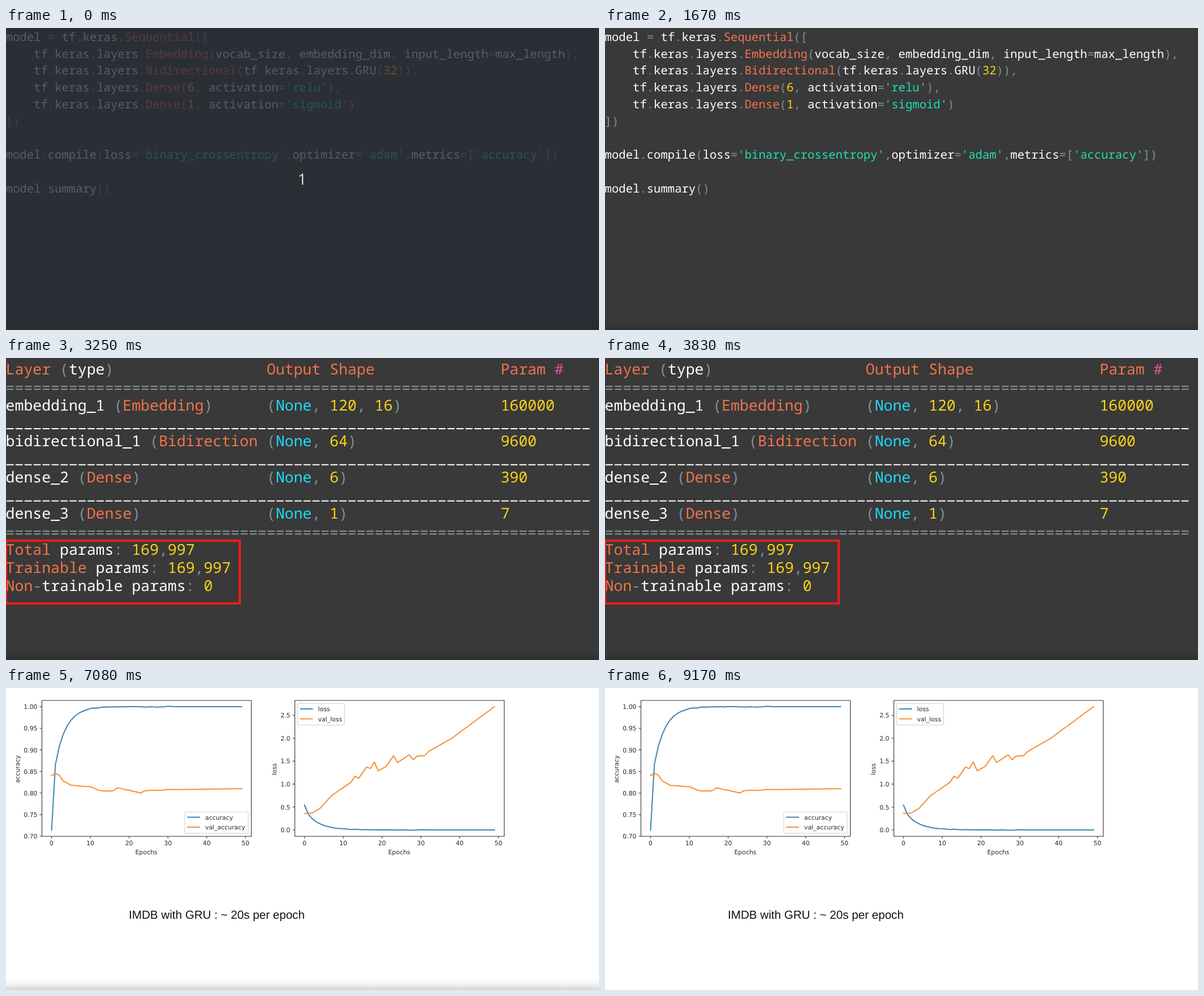
Animation of 1048x534 px, one loop 9.41 s. Source, as an HTML page:

```html
<!DOCTYPE html>
<html lang="en">
<head>
<meta charset="utf-8">
<title>Model summary and training curves</title>
<style>
html, body { margin: 0; width: 100%; height: 100%; overflow: hidden; background: #393939; }
svg { display: block; width: 1048px; height: 534px; }
text { white-space: pre; text-rendering: geometricPrecision; }
.code { font-family: "Noto Sans Mono", "DejaVu Sans Mono", monospace; fill: #fff; }
.plot { font: 10.9px "DejaVu Sans", sans-serif; fill: #2a2a2a; }
.note { font: 20.6px "Liberation Sans", Arial, sans-serif; fill: #111; }
.count { font: 27px "Open Sans", "Noto Sans", sans-serif; fill: #e2e6e2; }
</style>
</head>
<body>
<svg id="stage" viewBox="0 0 1048 534" xmlns="http://www.w3.org/2000/svg">
  <defs>
    <linearGradient id="fade" x1="0" y1="0" x2="0" y2="1">
      <stop offset="0" stop-color="#000" stop-opacity="0"/>
      <stop offset=".5" stop-color="#000" stop-opacity=".05"/>
      <stop offset="1" stop-color="#000" stop-opacity=".17"/>
    </linearGradient>
  </defs>
  <rect id="back" width="1048" height="534"/>
  <g id="model"></g>
  <g id="summary"></g>
  <g id="charts"></g>
  <rect id="shade" y="514" width="1048" height="20" fill="url(#fade)"/>
  <g id="intro">
    <rect width="1048" height="516" fill="#292c34" opacity=".77"/>
    <rect y="516" width="1048" height="18" fill="#2a2d30"/>
    <text class="count" x="523.5" y="277" text-anchor="middle">1</text>
  </g>
</svg>
<script>
const LOOP = 9410, EPOCHS = 50;
const BLUE = '#3b86b2', ORANGE = '#f49035';
const $ = id => document.getElementById(id);

function add(parent, tag, attrs, content) {
  const el = document.createElementNS('http://www.w3.org/2000/svg', tag);
  for (const key in attrs) el.setAttribute(key, attrs[key]);
  if (content !== undefined) el.textContent = content;
  parent.appendChild(el);
  return el;
}

// Syntax colours, in the order of the groups in TOKEN
const TOKEN = /('[^']*')|(None)|([A-Z][a-z]+)|(\b\d+\b)|(#)|([=.,()[\]:-]+)/g;
const INK = ['#1fdfb2', '#1cdcfb', '#f2744b', '#fbd416', '#e0509f', '#7f9195'];

function codeLine(parent, line, y, size) {
  const text = add(parent, 'text', { class: 'code', x: -.4, y, 'font-size': size });
  let last = 0;
  for (const m of line.matchAll(TOKEN)) {
    if (m.index > last) add(text, 'tspan', {}, line.slice(last, m.index));
    add(text, 'tspan', { fill: INK[m.slice(1).findIndex(Boolean)] }, m[0]);
    last = m.index + m[0].length;
  }
  if (last < line.length) add(text, 'tspan', {}, line.slice(last));
}

function buildModel() {
  const layer = '    tf.keras.layers.';
  [
    'model = tf.keras.Sequential([',
    layer + 'Embedding(vocab_size, embedding_dim, input_length=max_length),',
    layer + 'Bidirectional(tf.keras.layers.GRU(32)),',
    layer + "Dense(6, activation='relu'),",
    layer + "Dense(1, activation='sigmoid')",
    '])',
    '',
    "model.compile(loss='binary_crossentropy',optimizer='adam',metrics=['accuracy'])",
    '',
    'model.summary()'
  ].forEach((line, i) => codeLine($('model'), line, 22.9 + i * 29.75, 20.6));
}

function buildSummary() {
  const g = $('summary');
  const row = (a, b, c) => a.padEnd(29) + b.padEnd(26) + c;
  const bar = '='.repeat(65), rule = '_';
  [
    row('Layer (type)', 'Output Shape', 'Param #'),
    bar,
    row('embedding_1 (Embedding)', '(None, 120, 16)', '160000'),
    rule,
    row('bidirectional_1 (Bidirection', '(None, 64)', '9600'),
    rule,
    row('dense_2 (Dense)', '(None, 6)', '390'),
    rule,
    row('dense_3 (Dense)', '(None, 1)', '7'),
    bar,
    'Total params: 169,997',
    'Trainable params: 169,997',
    'Non-trainable params: 0'
  ].forEach((line, i) => {
    const y = 28.6 + i * 31.95;
    if (line === rule) {
      add(g, 'path', { d: `M1 ${y + .5}H1032`, stroke: '#fff', 'stroke-width': 2, 'stroke-dasharray': '12.7 3.2' });
    } else {
      codeLine(g, line, line === bar ? y + 1.8 : y, 26.5);
    }
  });
  add(g, 'rect', { x: 0, y: 323, width: 413, height: 111, fill: 'none', stroke: '#f91b13', 'stroke-width': 4 });
}

// Seeded jitter while training is unsettled, in -0.5..0.5
function jitter(i) {
  if (i < 9 || i > 31) return 0;
  const s = Math.sin(i * 12.9898) * 43758.5453;
  return s - Math.floor(s) - .5;
}

// Straight lines between [epoch, value] keys
function through(...keys) {
  return i => {
    const k = Math.max(1, keys.findIndex(([e]) => e >= i));
    const [e0, v0] = keys[k - 1], [e1, v1] = keys[k];
    return v0 + (v1 - v0) * (i - e0) / (e1 - e0);
  };
}

const decay = (size, rate) => i => size * Math.exp(-rate * i);
const accSlow = decay(.189, .36), accFast = decay(.097, 4);
const lossSlow = decay(.444, .3), lossFast = decay(.099, 2);

const accuracy = i => 1 - accSlow(i) - accFast(i) + .002 * jitter(i);
const loss = i => lossSlow(i) + lossFast(i) + .01 * jitter(i);
const valAccuracyTrend = through([0, .84], [1, .846], [2, .841], [3, .828], [5, .818],
  [10, .814], [13, .804], [16, .805], [17, .812], [23, .8], [24, .806], [32, .808], [49, .81]);
const valAccuracy = i => valAccuracyTrend(i) + .002 * jitter(i);
const valLoss = through([0, .36], [2, .37], [4, .47], [7, .75], [12, 1.04], [13, 1.17], [14, 1.13],
  [16, 1.37], [17, 1.34], [18, 1.48], [19, 1.29], [21, 1.38], [23, 1.62], [24, 1.47],
  [27, 1.64], [28, 1.53], [29, 1.61], [31, 1.62], [32, 1.71], [38, 2], [49, 2.69]);

function label(g, x, y, content, anchor = 'middle', more = {}) {
  add(g, 'text', { class: 'plot', x, y, 'text-anchor': anchor, ...more }, content);
}

function chart({ left, name, nameX, base, zero, scale, tick, count, digits, legend, curves }) {
  const g = $('charts'), right = left + 370, x0 = left + 17, step = 6.855;
  const toY = v => zero - (v - base) * scale;
  const colors = [BLUE, ORANGE];

  curves.forEach((curve, n) => {
    const points = Array.from({ length: EPOCHS }, (_, i) => `${x0 + i * step},${toY(curve(i))}`);
    add(g, 'polyline', {
      points: points.join(' '), fill: 'none', stroke: colors[n], 'stroke-width': 2,
      'stroke-linejoin': 'round', 'stroke-linecap': 'square'
    });
  });

  let d = `M${left} 22H${right}V262.3H${left}Z`;
  for (let i = 0; i <= EPOCHS; i += 10) {
    const x = x0 + i * step;
    d += `M${x} 262v4`;
    label(g, x, 278, i);
  }
  for (let i = 0; i < count; i++) {
    const value = base + i * tick, y = toY(value);
    d += `M${left} ${y}h-4`;
    label(g, left - 8, y + 4.1, value.toFixed(digits), 'end');
  }
  add(g, 'path', { d, fill: 'none', stroke: '#333', 'stroke-width': 1.1 });
  label(g, left + 184.5, 293.5, 'Epochs');
  label(g, 0, 0, name, 'middle', { transform: `translate(${nameX} 143.5) rotate(-90)` });

  const [lx, ly, lw] = legend;
  add(g, 'rect', { x: lx, y: ly, width: lw, height: 38, rx: 2, fill: '#fff', stroke: '#ccc' });
  [name, 'val_' + name].forEach((item, n) => {
    const y = ly + 9.5 + n * 17.5;
    add(g, 'path', { d: `M${lx + 4} ${y}h23`, stroke: colors[n], 'stroke-width': 2 });
    label(g, lx + 36, y + 4, item, 'start');
  });
}

function buildCharts() {
  chart({
    left: 63.5, name: 'accuracy', nameX: 24,
    base: .7, zero: 262, scale: 763, tick: .05, count: 7, digits: 2,
    legend: [316, 219, 112], curves: [accuracy, valAccuracy]
  });
  chart({
    left: 510.5, name: 'loss', nameX: 478,
    base: 0, zero: 251, scale: 81.1, tick: .5, count: 6, digits: 1,
    legend: [515.5, 27.5, 83], curves: [loss, valLoss]
  });
  add($('charts'), 'text', { class: 'note', x: 217.1, y: 408.2 }, 'IMDB with GRU : ~ 20s per epoch');
}

function show(id, on) {
  $(id).setAttribute('display', on ? 'inline' : 'none');
}

function render(t) {
  show('intro', t < 80);
  show('model', t < 3250);
  show('summary', t >= 3250 && t < 7080);
  show('charts', t >= 7080);
  show('shade', t >= 80 && t < 9170);
  $('back').setAttribute('fill', t < 7080 ? '#393939' : '#fff');
}

buildModel();
buildSummary();
buildCharts();
const start = performance.now();
function tick() {
  render((performance.now() - start) % LOOP);
  requestAnimationFrame(tick);
}
render(0);
requestAnimationFrame(tick);
</script>
</body>
</html>
```
